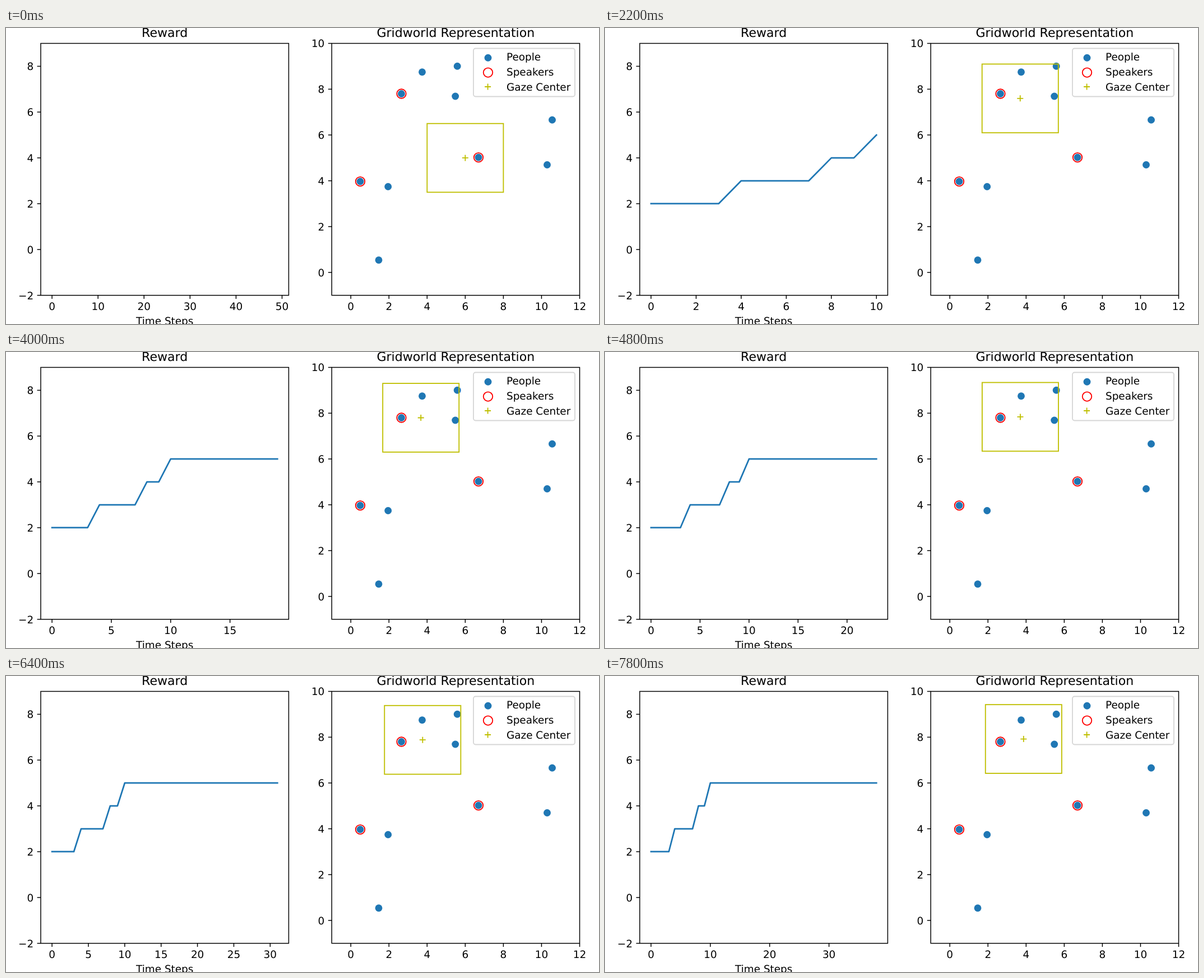
Recreate the animation shown at these times as an HTML page. Size 1058x529 px, loop 8 s.

```html
<!DOCTYPE html>
<html lang="en">
<head>
<meta charset="utf-8">
<title>Reward and gridworld</title>
<style>
  html, body { margin: 0; width: 100%; height: 100%; overflow: hidden; background: #fff; }
  svg { display: block; width: 100%; height: 100%; }
  text { font: 18.4px "DejaVu Sans", sans-serif; fill: #000; text-rendering: geometricPrecision; }
  .title { font-size: 22.08px; }
  .axis { fill: none; stroke: #000; stroke-width: 1.47; }
  .person { fill: #1f77b4; }
  .speaker { fill: none; stroke: #f00; stroke-width: 1.84; }
  .gaze { fill: none; stroke: #bfbf00; stroke-width: 1.84; }
  .curve { fill: none; stroke: #1f77b4; stroke-width: 2.76; stroke-linecap: square; stroke-linejoin: round; }
</style>
</head>
<body>
<svg id="stage" viewBox="0 0 1058 529"></svg>
<script>
const STEP_MS = 200, STEPS = 40;
const TOP = 27.5, BOTTOM = 477.7, TICK = 6.4;
const LEFT = { x0: 62, x1: 504.4 };
const RIGHT = { x0: 581.2, x1: 1023.5 };
const UNIT_X = (RIGHT.x1 - RIGHT.x0) / 13;
const UNIT_Y = (BOTTOM - TOP) / 11;

const stage = document.getElementById('stage');

function add(parent, tag, attrs, text) {
  const el = document.createElementNS('http://www.w3.org/2000/svg', tag);
  for (const key in attrs) el.setAttribute(key, attrs[key]);
  if (text !== undefined) el.textContent = text;
  parent.appendChild(el);
  return el;
}

const gridX = x => RIGHT.x0 + (x + 1) * UNIT_X;
const gridY = y => BOTTOM - (y + 1) * UNIT_Y;
const rewardY = v => BOTTOM - (v + 2) * UNIT_Y;
const minus = s => s.replace('-', '\u2212');

function label(parent, x, y, text, anchor, cls) {
  add(parent, 'text', { x, y, 'text-anchor': anchor, class: cls || '' }, text);
}

function tickX(parent, x, text) {
  add(parent, 'path', { class: 'axis', d: `M${x} ${BOTTOM}v${TICK}` });
  label(parent, x, 504.3, text, 'middle');
}

function tickY(axes, y, text) {
  add(stage, 'path', { class: 'axis', d: `M${axes.x0} ${y}h${-TICK}` });
  label(stage, axes.x0 - 12.9, y + 6.9, text, 'end');
}

function frame(axes, title) {
  add(stage, 'rect', {
    class: 'axis', x: axes.x0, y: TOP, width: axes.x1 - axes.x0, height: BOTTOM - TOP
  });
  label(stage, (axes.x0 + axes.x1) / 2, 16.3, title, 'middle', 'title');
}

const person = (cx, cy) => add(stage, 'circle', { class: 'person', cx, cy, r: 6.45 });
const speaker = (cx, cy) => add(stage, 'circle', { class: 'speaker', cx, cy, r: 8.25 });
const crossPath = (x, y) => `M${x - 5.5} ${y}h11M${x} ${y - 5.5}v11`;

// Monotone cubic curve through [t, v] points
function monotone(pts) {
  const last = pts.length - 1;
  const sec = pts.slice(1).map((p, i) => (p[1] - pts[i][1]) / (p[0] - pts[i][0]));
  const slope = pts.map((p, i) => {
    if (i === 0) return sec[0];
    if (i === last) return sec[last - 1];
    const a = sec[i - 1], b = sec[i];
    return a * b > 0 ? 2 * a * b / (a + b) : 0;
  });
  return t => {
    let i = 0;
    while (i < last - 1 && t > pts[i + 1][0]) i++;
    const [t0, v0] = pts[i], [t1, v1] = pts[i + 1];
    const h = t1 - t0, u = (t - t0) / h, w = 1 - u;
    return v0 * (1 + 2 * u) * w * w + slope[i] * h * u * w * w
         + v1 * u * u * (3 - 2 * u) - slope[i + 1] * h * u * u * w;
  };
}

const gazeX = monotone([[0, 6], [3, 4.97], [6, 4], [8, 3.8], [11, 3.69],
                        [17, 3.667], [24, 3.695], [32, 3.765], [39, 3.868]]);
const gazeY = monotone([[0, 5], [3, 6.12], [6, 7.075], [8, 7.33], [11, 7.597],
                        [14, 7.7], [17, 7.762], [24, 7.84], [32, 7.882], [39, 7.922]]);
const reward = n => 2 + (n > 3) + (n > 7) + (n > 9);

// Static parts
frame(LEFT, 'Reward');
for (let v = -2; v <= 8; v += 2) tickY(LEFT, rewardY(v), minus(String(v)));
label(stage, (LEFT.x0 + LEFT.x1) / 2, 529.8, 'Time Steps', 'middle');
const ticks = add(stage, 'g', {});
const curve = add(stage, 'path', { class: 'curve' });

const people = [[742.5, 78.8], [805.2, 68.3], [801.7, 122], [974.5, 164.3],
                [965.5, 244.5], [681.7, 283.5], [665, 414.7]];
const speakers = [[705.5, 117.5], [843, 231.3], [632, 274.3]];
people.concat(speakers).forEach(p => person(...p));
speakers.forEach(p => speaker(...p));
const view = add(stage, 'rect', { class: 'gaze', width: 4 * UNIT_X, height: 3 * UNIT_Y });
const cross = add(stage, 'path', { class: 'gaze' });

frame(RIGHT, 'Gridworld Representation');
for (let x = 0; x <= 12; x += 2) tickX(stage, gridX(x), String(x));
for (let y = 0; y <= 10; y += 2) tickY(RIGHT, gridY(y), String(y));

add(stage, 'rect', {
  x: 834, y: 36.5, width: 181, height: 86, rx: 3.7,
  fill: '#fff', 'fill-opacity': 0.8, stroke: '#d6d6d6', 'stroke-width': 1.84
});
person(860, 53.2);
speaker(860, 79.6);
add(stage, 'path', { class: 'gaze', d: crossPath(859.6, 105) });
['People', 'Speakers', 'Gaze Center'].forEach((s, i) => label(stage, 893, 58.2 + i * 26.7, s, 'start'));

// Tick spacing that fits at most eight intervals
function tickStep(range) {
  const raw = range / 8;
  const scale = 10 ** Math.floor(Math.log10(raw));
  return scale * [1, 2, 2.5, 5, 10].find(s => s * scale >= raw - 1e-9);
}

function drawTicks(lo, hi, toX) {
  ticks.replaceChildren();
  const step = tickStep(hi - lo);
  let digits = 0;
  while (Math.abs(step * 10 ** digits - Math.round(step * 10 ** digits)) > 1e-6) digits++;
  for (let i = Math.ceil(lo / step); i * step <= hi; i++) {
    tickX(ticks, toX(i * step), minus((i * step).toFixed(digits)));
  }
}

function draw(k) {
  const n = k ? k - 1 : 49;
  const pad = n ? n * 0.05 : 0.055;
  const lo = -pad, hi = n + pad;
  const toX = v => LEFT.x0 + (v - lo) / (hi - lo) * (LEFT.x1 - LEFT.x0);
  drawTicks(lo, hi, toX);

  let d = '';
  if (k > 1) {
    for (let i = 0; i <= n; i++) d += `${i ? 'L' : 'M'}${toX(i).toFixed(2)} ${rewardY(reward(i)).toFixed(2)}`;
  }
  curve.setAttribute('d', d);

  const x = gazeX(k), y = gazeY(k);
  view.setAttribute('x', gridX(x - 2));
  view.setAttribute('y', gridY(y + 1.5));
  cross.setAttribute('d', crossPath(gridX(x), gridY(y)));
}

let shown = -1;
const start = performance.now();
function tick() {
  const k = Math.floor((performance.now() - start) / STEP_MS) % STEPS;
  if (k !== shown) draw(shown = k);
  requestAnimationFrame(tick);
}
tick();
</script>
</body>
</html>
```
